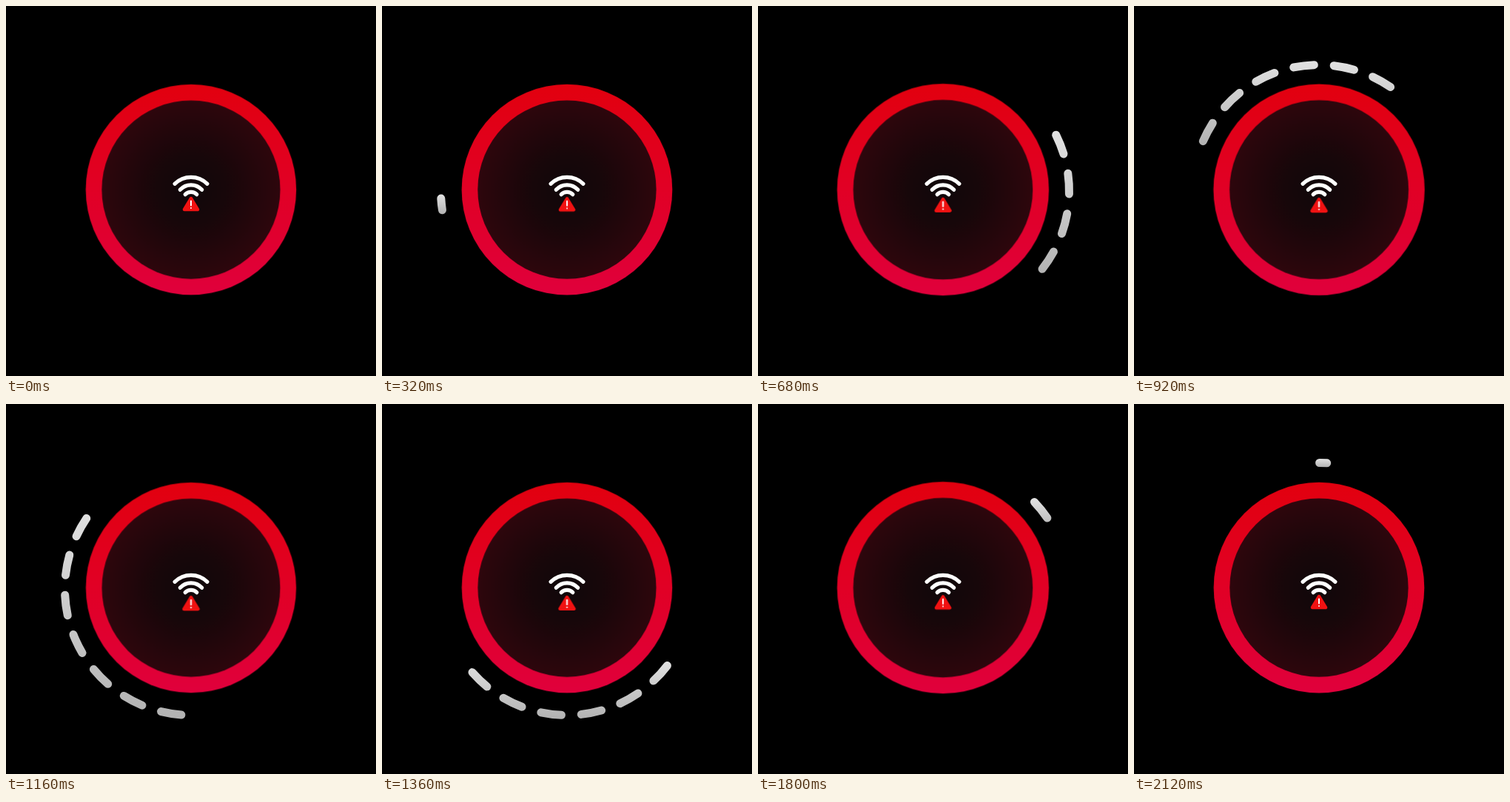
An HTML page for the animation above (2.16 s loop, 500 by 500 pixels).

```html
<!DOCTYPE html>
<html lang="en">
<head>
<meta charset="utf-8">
<title>Connection alert</title>
<style>
  html, body { margin: 0; width: 100%; height: 100%; overflow: hidden; background: #000; }
  svg { display: block; width: 100%; height: 100%; }
  .disc, .warning { transform-box: view-box; }
  .disc {
    transform-origin: 250px 248.2px;
    animation: swell 540ms ease-in-out -940ms infinite alternate;
  }
  .warning {
    transform-origin: 250px 268px;
    animation: nudge 1080ms ease-in-out infinite alternate;
  }
  @keyframes swell { from { transform: scale(.998); } to { transform: scale(1.005); } }
  @keyframes nudge { to { transform: translateY(1.7px) scale(1.05); } }
</style>
</head>
<body>
<svg viewBox="0 0 500 500">
  <defs>
    <linearGradient id="red" x1="0" y1="0" x2="0" y2="1">
      <stop offset="0" stop-color="#e2000f"/>
      <stop offset="1" stop-color="#e0003c"/>
    </linearGradient>
    <radialGradient id="dark">
      <stop offset="0" stop-color="#10080a"/>
      <stop offset=".4" stop-color="#18070a"/>
      <stop offset="1" stop-color="#2e060d"/>
    </radialGradient>
    <linearGradient id="silver" gradientUnits="userSpaceOnUse" x1="0" x2="0">
      <stop offset="0" stop-color="#e2e2e2"/>
      <stop offset="1" stop-color="#b2b2b2"/>
    </linearGradient>
  </defs>

  <g class="disc">
    <circle cx="250" cy="248.2" r="142.4" fill="url(#red)"/>
    <circle cx="250" cy="248.2" r="120.7" fill="url(#dark)"/>
  </g>

  <g fill="none" stroke="#fff" stroke-width="5.2" stroke-linecap="round">
    <path d="M228 240.3A31.4 31.4 0 0 1 272 240.3"/>
    <path d="M235.3 248.3A20 20 0 0 1 264.7 248.3"/>
    <path d="M242.2 254.7A11 11 0 0 1 257.8 254.7"/>
  </g>

  <g class="warning">
    <path d="M250 260L259 275H241Z" fill="#f01212" stroke="#f01212" stroke-width="4.4" stroke-linejoin="round"/>
    <path d="M250 263.5V269.5M250 273V273.1" stroke="#fff" stroke-width="2" stroke-linecap="round"/>
  </g>

  <path id="arc" fill="none" stroke="url(#silver)" stroke-width="11"
        stroke-linecap="round" stroke-dasharray="27.8 26.86"/>
</svg>
<script>
  const LOOP = 2160, STEP = 40, RADIUS = 170.5, CENTER = 250, HALF_STROKE = 5.5;
  const arc = document.getElementById('arc');
  const silver = document.getElementById('silver');

  // Keys are [time, value, slope]; angles in degrees.
  // head: counter-clockwise travel from the top. span: arc trailing behind it.
  const head = [
    [0, 0, .15], [320, 98.7, .421], [680, 296.4, .527], [1160, 535.6, .348],
    [1360, 592.6, .254], [1800, 673.6, .16], [2120, 719.8, .144], [2160, 725.5, .144]
  ];
  const span = [
    [0, 0, 0], [320, 5.3, .045], [680, 68, .15], [1160, 124, -.04],
    [1360, 106, -.17], [1800, 14, -.07], [2120, 3.4, -.04], [2160, 0, -.085]
  ];

  // Cubic Hermite interpolation between keys.
  function valueAt(keys, t) {
    const i = keys.findIndex(k => k[0] > t);
    const [t0, v0, m0] = keys[i - 1], [t1, v1, m1] = keys[i];
    const h = t1 - t0, s = (t - t0) / h, r = 1 - s;
    return v0 * r * r * (1 + 2 * s) + v1 * s * s * (1 + 2 * r) + h * s * r * (m0 * r - m1 * s);
  }

  function pointAt(deg) {
    const a = deg * Math.PI / 180;
    return (CENTER + RADIUS * Math.sin(a)).toFixed(3) + ' ' + (CENTER - RADIUS * Math.cos(a)).toFixed(3);
  }

  function draw(now) {
    const t = Math.floor(now % LOOP / STEP) * STEP;
    const length = valueAt(span, t);
    const visible = length > .01;
    arc.style.display = visible ? '' : 'none';
    if (visible) {
      const start = -valueAt(head, t);
      arc.setAttribute('d', `M${pointAt(start)}A${RADIUS} ${RADIUS} 0 0 1 ${pointAt(start + length)}`);
      const box = arc.getBBox();
      silver.setAttribute('y1', box.y - HALF_STROKE);
      silver.setAttribute('y2', box.y + box.height + HALF_STROKE);
    }
  }

  let origin;
  function tick(now) {
    origin ??= now;
    draw(Math.max(0, now - origin));
    requestAnimationFrame(tick);
  }
  draw(0);
  requestAnimationFrame(tick);
</script>
</body>
</html>
```
